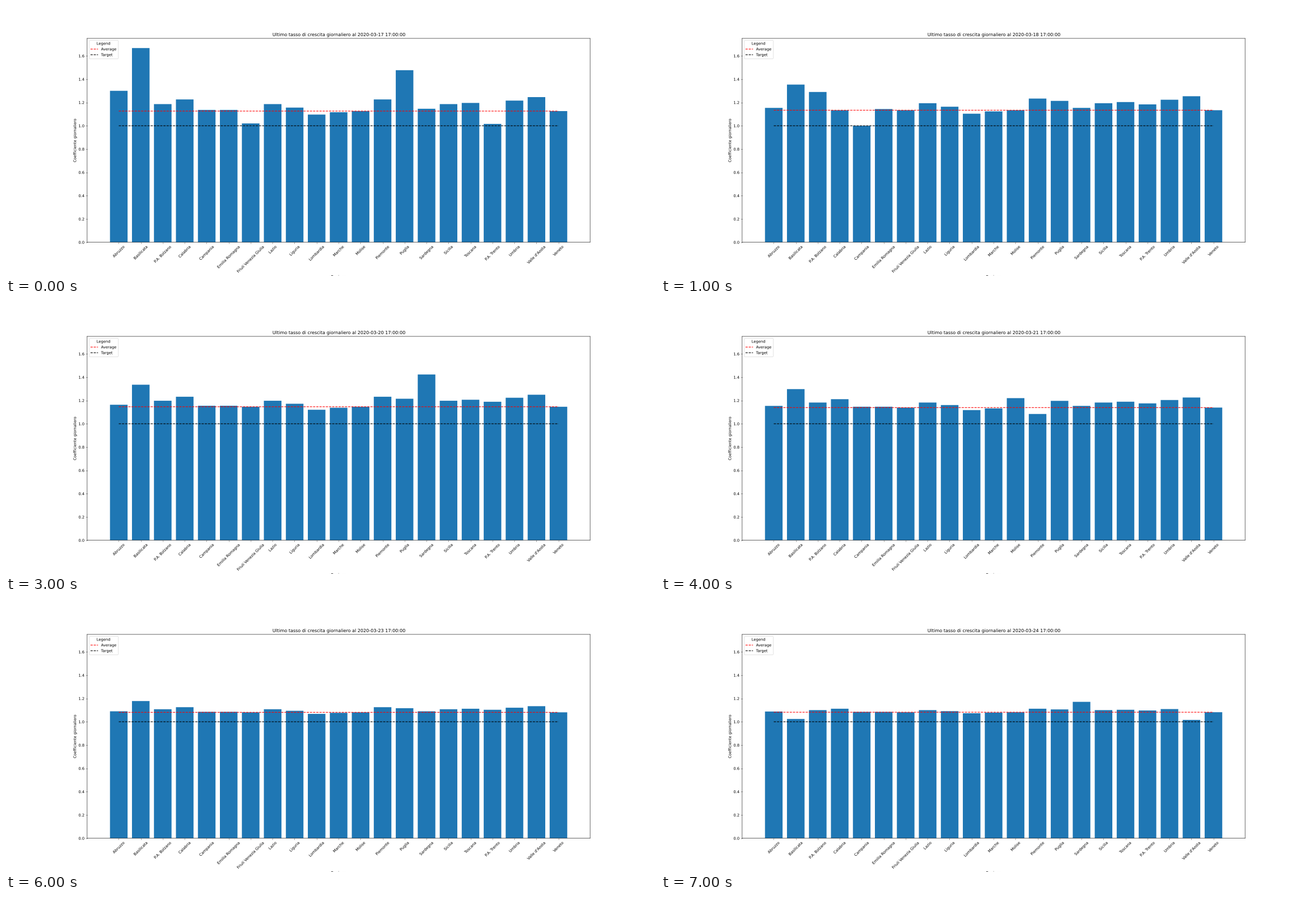
Write a matplotlib script that moves like this. It is 1159x483 px and loops after 8 s.

```python
import numpy as np
import matplotlib.pyplot as plt
from matplotlib.animation import FuncAnimation
from matplotlib.patheffects import Normal
from matplotlib.text import Text

plt.rcParams.update({
    "font.family": "DejaVu Sans",
    "text.hinting": "none",
    "figure.subplot.left": 0.125,
    "figure.subplot.right": 0.9,
    "figure.subplot.bottom": 0.125,
    "figure.subplot.top": 0.88,
    "lines.linewidth": 1.6,
    "axes.linewidth": 0.9,
})

WIDTH, HEIGHT = 1159, 483
DPI = WIDTH / 24
FIRST_DAY = 17
AVERAGE = [1.126, 1.1335, 1.149, 1.146, 1.139, 1.104, 1.081, 1.082]

# How far each region usually lies from the average
SPREAD = {
    "Abruzzo": 0.02, "Basilicata": 0.22, "P.A. Bolzano": 0.06,
    "Calabria": 0.10, "Campania": 0.01, "Emilia Romagna": 0.01,
    "Friuli Venezia Giulia": 0.0, "Lazio": 0.06, "Liguria": 0.03,
    "Lombardia": -0.03, "Marche": -0.01, "Molise": 0.0, "Piemonte": 0.10,
    "Puglia": 0.08, "Sardegna": 0.02, "Sicilia": 0.06, "Toscana": 0.07,
    "P.A. Trento": 0.05, "Umbria": 0.09, "Valle d'Aosta": 0.12,
    "Veneto": 0.0,
}
REGIONS = list(SPREAD)

# Peaks and dips that break out of the trend, by day
JUMPS = {
    17: {"Abruzzo": 1.3, "Basilicata": 1.667, "Friuli Venezia Giulia": 1.02,
         "Puglia": 1.477, "P.A. Trento": 1.016},
    18: {"P.A. Bolzano": 1.29, "Calabria": 1.133, "Campania": 1.0},
    19: {"Abruzzo": 1.464, "Campania": 1.416, "Friuli Venezia Giulia": 1.297,
         "Molise": 1.641, "Sardegna": 1.539, "Toscana": 1.114,
         "Umbria": 1.352},
    20: {"Sardegna": 1.423},
    21: {"Molise": 1.22, "Piemonte": 1.084},
    22: {"Sardegna": 1.026, "Sicilia": 1.284, "P.A. Trento": 1.22},
    24: {"Basilicata": 1.024, "Sardegna": 1.171, "Valle d'Aosta": 1.016},
}


def growth_on(i):
    """Average plus each region's spread, which narrows in later days."""
    fade = np.interp(i, [2, 7], [1, 0.3])
    jumps = JUMPS.get(FIRST_DAY + i, {})
    return [jumps.get(name, AVERAGE[i] + fade * spread)
            for name, spread in SPREAD.items()]


# The small surplus keeps the pixel size from rounding down
fig, ax = plt.subplots(
    figsize=((WIDTH + 0.01) / DPI, (HEIGHT + 0.01) / DPI), dpi=DPI)
x = np.arange(len(REGIONS))
bars = ax.bar(x, growth_on(0), color="#1f77b4")
average, = ax.plot(x, np.full(len(x), AVERAGE[0]), "r--", label="Average")
target, = ax.plot(x, np.ones(len(x)), "k--", label="Target")

ax.set_xlim(-1.44, 21.44)
ax.set_ylim(0, 1.75)
ax.set_yticks(np.arange(0, 1.7, 0.2))
ax.set_xticks(x, REGIONS, rotation=45)
ax.set_xlabel("Regione")
ax.set_ylabel("Coefficiente giornaliero")
legend = ax.legend(title="Legend", loc="upper left")
title = ax.set_title("")

# Place shapes and text between whole pixels
for shape in [*bars, average, target, *ax.spines.values(),
              *legend.get_lines()]:
    shape.set_snap(False)
for text in fig.findobj(Text):
    text.set_path_effects([Normal()])


def update(i):
    for bar, value in zip(bars, growth_on(i)):
        bar.set_height(value)
    average.set_ydata(np.full(len(x), AVERAGE[i]))
    title.set_text("Ultimo tasso di crescita giornaliero al "
                   f"2020-03-{FIRST_DAY + i} 17:00:00")
    return [*bars, average, title]


anim = FuncAnimation(fig, update, frames=len(AVERAGE), interval=1000,
                     repeat=True, repeat_delay=0, blit=False)
plt.show()
```
